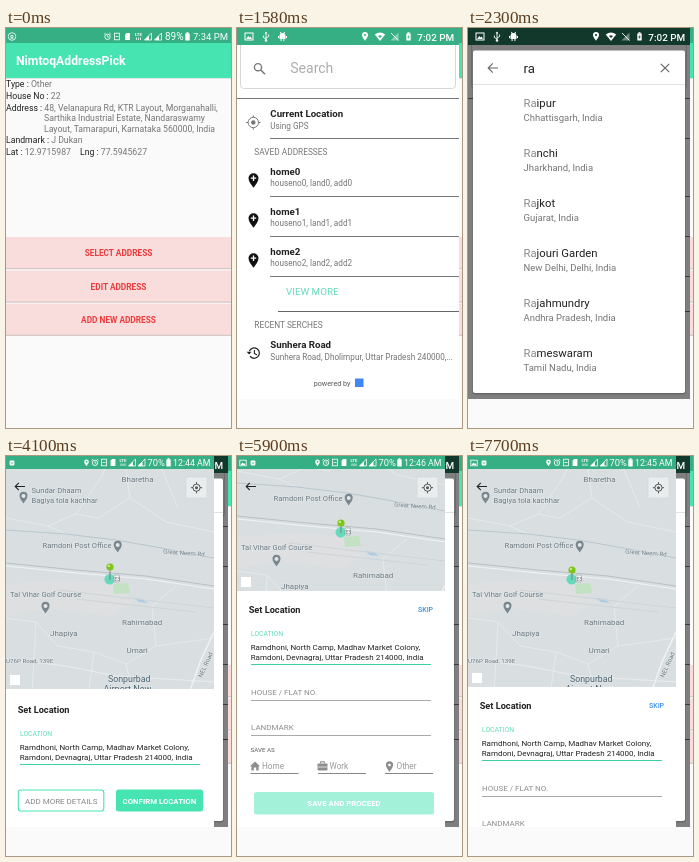
Recreate the animation shown at these times as an HTML page. Size 225 px wide and 400 px high, loop 8000 ms.

```html
<!DOCTYPE html>
<html lang="en">
<head>
<meta charset="utf-8">
<title>Address picker</title>
<style>
html, body { margin: 0; width: 100%; height: 100%; overflow: hidden; background: #fafafa; }
svg { display: block; width: 100%; height: 100%; }
text { font-family: Roboto, "Noto Sans", sans-serif; white-space: pre; }
</style>
</head>
<body>
<svg id="stage" viewBox="0 0 225 400" preserveAspectRatio="none"></svg>
<script>
const LOOP = 8000;
const GREEN = '#46e4b1', BAR = '#36af85', INK = '#212121', GREY = '#757575';

// Drawing helpers
const rect = (x, y, w, h, fill, more = '') =>
  `<rect x="${x}" y="${y}" width="${w}" height="${h}" fill="${fill}" ${more}/>`;
const text = (x, y, size, str, fill = INK, more = '') =>
  `<text x="${x}" y="${y}" font-size="${size}" fill="${fill}" ${more}>${str}</text>`;
const bold = (x, y, size, str, fill = INK, more = '') =>
  text(x, y, size, str, fill, 'font-weight="700" ' + more);
const path = (d, fill, more = '') => `<path d="${d}" fill="${fill}" ${more}/>`;
const line = (d, color, width = 1, more = '') =>
  path(d, 'none', `stroke="${color}" stroke-width="${width}" ${more}`);
const rule = (x1, x2, y, color) => rect(x1, y, x2 - x1, 1, color);
const dot = (x, y, r, fill, more = '') => `<circle cx="${x}" cy="${y}" r="${r}" fill="${fill}" ${more}/>`;
const ring = (x, y, r, color, width = 1) => dot(x, y, r, 'none', `stroke="${color}" stroke-width="${width}"`);
const group = (body, more = '') => `<g ${more}>${body}</g>`;
const at = (x, y, body, turn = 0) => group(body, `transform="translate(${x} ${y}) rotate(${turn})"`);
const MID = 'text-anchor="middle"';

// Icons centred on 0,0
const drop = (r, fill) =>
  path(`M0 ${r * 1.6}C${-r * 0.4} ${r} ${-r} ${r * 0.4} ${-r} ${-r * 0.3}A${r} ${r} 0 0 1 ${r} ${-r * 0.3}C${r} ${r * 0.4} ${r * 0.4} ${r} 0 ${r * 1.6}Z`, fill);
const target = (r, color) => ring(0, 0, r, color, 1) + dot(0, 0, r * 0.42, color) +
  line(`M0 ${-r - 2}V${-r}M0 ${r}V${r + 2}M${-r - 2} 0H${-r}M${r} 0H${r + 2}`, color, 1);
const arrow = (head, color) => line(`M5 0H-4.6M${head - 4.8} ${-head}L-4.8 0L${head - 4.8} ${head}`, color, 1.1);
const plusPin = drop(5, '#111') + line('M0 -4.2V1.2M-2.7 -1.5H2.7', '#fff', 1.3);
const clock = line('M-4.6 -2A5.2 5.2 0 1 1 -4 3.2', '#222', 1.2) +
  path('M-7.4 -1.2H-2.4L-4.9 1.6Z', '#222') + line('M0.4 -3V0.4L3 2', '#222', 1.1);
const mapPin = drop(4, '#78868d') + dot(0, -1, 2, '#e3e7e9');
const picture = rect(-4, -3.5, 8, 7, 'none', 'stroke="#fff"') + path('M-3 2.5L-0.8 -0.5L0.6 1L1.6 0L3 2.5Z', '#fff');
const pocket = rect(-3, -3, 6, 6, '#fff', 'rx="1"') + line('M-1.5 -1L0 1L1.5 -1', BAR, 0.9);
const signal = path('M-3.5 3.5H3.5V-3.5Z', 'none', 'stroke="#fff" stroke-width="0.8"') + path('M-3.5 3.5H1V-1Z', '#fff');
const battery = rect(-2.2, -3.2, 4.4, 7.2, '#fff', 'rx="0.6"') + rect(-1, -4.3, 2, 1.2, '#fff');
const alarm = ring(0, 0.3, 2.7, '#fff', 0.9) + line('M0 -1.2V0.6H1.4M-3.4 -2.2L-1.8 -3.5M3.4 -2.2L1.8 -3.5', '#fff', 0.8);
const box = rect(-2.5, -3.3, 5, 6.6, 'none', 'stroke="#fff" stroke-width="0.8"') + line('M-1.5 0H1.5', '#fff', 0.8);
const sim = path('M-2.4 -2L-0.8 -3.6H2.4V3.6H-2.4Z', '#fff');
const lte = bold(0, -0.7, 4.4, 'LTE', '#fff', MID) + line('M-2 3.5V1M0 3.5V1M2 1V3.5', '#fff', 0.8);

function homeScreen() {
  const pair = (x, y, label, value) => text(x, y, 8.7, `${label} : <tspan fill="${GREY}">${value}</tspan>`);
  const button = (y, label) =>
    rect(0, y + 1.2, 225, 31, '#d2c6c6') + rect(0, y, 225, 31, '#f9dddd') +
    bold(112.5, y + 19, 8.3, label, '#ee3b3b', MID);
  return rect(0, 0, 225, 400, '#fafafa') + rect(0, 0, 225, 16, BAR) + rect(0, 15, 225, 35, GREEN) +
    rect(0, 50, 225, 1, '#dfe6e3') +
    ring(6, 8.5, 3.8, '#fff', 0.8) + bold(6, 10.6, 5.5, 'R', '#fff', MID) +
    at(101.5, 8.5, alarm) + at(111, 8.5, box) + at(121.5, 8.5, sim) + at(132.5, 8.5, lte) +
    at(142, 8.5, signal) + at(152, 8.5, signal) +
    text(159, 12.2, 10, '89%', '#fff') + at(181.5, 8.5, battery) + text(187, 12.2, 9.5, '7:34 PM', '#fff') +
    bold(10, 37, 12.2, 'NimtoqAddressPick', '#fff') +
    pair(0, 59, 'Type', 'Other') + pair(0, 71.3, 'House No', '22') +
    pair(0, 83, 'Address', '48, Velanapura Rd, KTR Layout, Morganahalli,') +
    text(38, 93.4, 8.7, 'Sarthika Industrial Estate, Nandaraswamy', GREY) +
    text(38, 103.6, 8.7, 'Layout, Tamarapuri, Karnataka 560000, India', GREY) +
    pair(0, 115.4, 'Landmark', 'J Dukan') + pair(0, 127.4, 'Lat', '12.9715987') + pair(74, 127.4, 'Lng', '77.5945627') +
    button(209, 'SELECT ADDRESS') + button(242.5, 'EDIT ADDRESS') + button(275.7, 'ADD NEW ADDRESS');
}

// Status bar shared by the search screens
const searchBar = (color) => rect(0, 0, 222, 17, color) +
  at(12, 8.5, picture) +
  at(29, 8.5, line('M0 4.5V-4M-2.6 -1V1L0 2.6M2.6 -2V0L0 1.6', '#fff', 0.9) + dot(0, 4, 1.2, '#fff') + path('M-1.4 -3H1.4L0 -5Z', '#fff')) +
  at(45.5, 8.5, path('M-3 -0.5A3 3 0 0 1 3 -0.5V2.5H-3Z', '#fff') + line('M-1.4 2V4.6M1.4 2V4.6M-2 -4.6L-1 -2M2 -4.6L1 -2M-4 -0.5V1.6M4 -0.5V1.6', '#fff', 1)) +
  at(128, 8, drop(3, '#fff') + dot(0, -1, 1.1, color)) +
  at(143, 8.5, path('M-5.2 -2Q0 -6 5.2 -2L0 4.6Z', '#fff') + path('M0 1.6L-2 -0.6L0 -1.2L2 -0.6Z', color)) +
  at(157.5, 8.5, path('M-4 4H4V-4Z', '#fff', 'opacity="0.4"') + line('M-3.5 -3.5L4 4', '#fff', 0.9)) +
  at(171.5, 8.5, battery + path('M0.5 -2L-1.3 1H0L-0.5 3L1.3 0H0Z', color)) +
  text(180.3, 12.5, 9.9, '7:02 PM', '#fff', 'font-weight="500"');

function listScreen() {
  const row = (y, title, sub) => bold(33.3, y, 9.7, title) + text(33.3, y + 11.8, 8.2, sub, GREY);
  const saved = [0, 1, 2].map(i => {
    const y = 146.5 + i * 40;
    return row(y, 'home' + i, `houseno${i}, land${i}, add${i}`) + at(16.5, y + 5.2, plusPin) + rule(33, 222, 168 + i * 40, '#777');
  }).join('');
  return rect(0, 0, 222, 371, '#fff') + searchBar(BAR) +
    path('M3.5 17V57.5Q3.5 60.5 6.5 60.5H215.5Q218.5 60.5 218.5 57.5V17', '#fff', 'stroke="#d8d8d8" stroke-width="1"') +
    ring(21, 39.2, 3.6, '#777', 1.4) + line('M23.8 42L28 46.2', '#777', 1.6) +
    text(53.3, 45.3, 14, 'Search', '#adadad') + rule(0, 222, 70, '#777') +
    row(89, 'Current Location', 'Using GPS') + at(16.3, 94.5, target(5.2, '#777')) +
    rule(33, 222, 110, '#777') + text(17.3, 127, 8.3, 'SAVED ADDRESSES', GREY) + saved +
    text(49, 267, 9.8, 'VIEW MORE', '#5fdcb6') + rule(41, 222, 283, '#666') +
    text(17.3, 300, 8.3, 'RECENT SERCHES', GREY) +
    row(320, 'Sunhera Road', 'Sunhera Road, Dholimpur, Uttar Pradesh 240000,...') + at(17, 325, clock) +
    text(76.7, 358, 7.2, 'powered by', '#555') + rect(118, 350.5, 8.5, 8.5, '#4285f4');
}

function suggestScreen() {
  const places = [
    ['ipur', 'Chhattisgarh, India'], ['nchi', 'Jharkhand, India'], ['jkot', 'Gujarat, India'],
    ['jouri Garden', 'New Delhi, Delhi, India'], ['jahmundry', 'Andhra Pradesh, India'], ['meswaram', 'Tamil Nadu, India']
  ];
  const rows = places.map(([rest, sub], i) =>
    text(55.5, 79.2 + i * 50, 11.3, `<tspan fill="#8a8a8a">Ra</tspan>${rest}`) +
    text(55.5, 93.3 + i * 50, 9.5, sub, GREY)).join('');
  return rect(0, 0, 222, 371, '#000', 'opacity="0.5"') + searchBar('#12382c') +
    rect(4.5, 23, 213, 343.4, '#000', 'rx="2" opacity="0.2"') + rect(5, 22.5, 212, 342.5, '#fff', 'rx="2"') +
    at(25, 40, arrow(4.6, '#666')) + text(55.5, 44.5, 13.2, 'ra') +
    line('M192.8 35.8L201.2 44.2M201.2 35.8L192.8 44.2', '#666', 1.2) + rule(5, 217, 56, '#e0e0e0') + rows;
}

function mapArt(pinY) {
  const minor = '#e8ecee', road = '#f0f3f4', label = '#67777f', city = '#46606f';
  const name = (x, y, str, size = 8, color = label) =>
    text(x, y, size, str, color, 'stroke="#e6eaec" stroke-width="1" paint-order="stroke"');
  return rect(0, 0, 208, 300, '#d9dfe1') +
    path('M0 128L60 124L112 128L128 146L104 160L40 152L0 160Z', '#dddfe0') +
    line('M0 62L42 70L70 58L96 20L104 0M42 70L60 78M118 0L124 42L160 66L208 76M124 42L92 62L70 58M150 0L172 52', minor, 0.8) +
    line('M0 162L30 166L52 190L88 196L120 208L150 190L208 182M88 196L82 240M30 166L26 240M150 190L146 150L170 130M120 208L128 240', minor, 0.8) +
    line('M0 74L60 78L110 84L150 91L208 102', '#b9c6cd', 1.2) +
    line('M0 107L70 114L140 120L208 130', '#b6c1c6', 1) +
    line('M0 110L70 117L140 123L208 133', road, 1) +
    path('M107 128L122 127L124 137L108 138Z', '#c3e2c3') + path('M128 142L136 143L142 147L133 146Z', '#a9cbe4') +
    line('M52 134L208 152M70 143L190 156', '#cdd4d7', 1.2) +
    line('M0 203L60 210L110 220L208 226', minor, 1.2) +
    line('M208 176L194 206L182 240', road, 1.4) +
    name(115.5, 26.2, 'Bharetha') + at(17.5, 41, mapPin) +
    name(25.5, 37, 'Sundar Dhaam', 7.6) + name(25.5, 46.6, 'Bagiya tola kachhar', 7.6) +
    name(36.5, 92, 'Ramdoni Post Office', 7.6) + at(111.7, 90, mapPin) +
    at(157, 97.5, name(0, 0, 'Great Neem Rd', 6.2), 4) +
    name(4, 141, 'Tal Vihar Golf Course', 7.6) + at(39.5, 151, mapPin) +
    name(116, 169, 'Rahimabad') + name(44, 180, 'Jhapiya') + name(120.5, 197, 'Umari') +
    name(0, 206.5, 'U76P Road, 139E', 6.2) + at(196, 222, name(0, 0, 'NEL Road', 6.2), -66) +
    name(102, 225.5, 'Sonpurbad', 8.8, city) + name(97.5, 236, 'Airport New', 9, city) +
    dot(103.7, 123.3, 5.2, '#48d8b4', 'opacity="0.8"') +
    rect(108, 119, 5.5, 7, '#f1f3f3', 'rx="1" stroke="#8d979b" stroke-width="0.6"') + text(108.6, 124.5, 4.6, 'E3', '#666') +
    line(`M104 ${pinY}V124`, '#777', 0.9) + dot(104, pinY, 3.6, '#7fc41c') + dot(102.9, pinY - 1.1, 1.2, '#c9ec85');
}

// Map screen: left status icons, clock, map offset, pin height, top of the sheet, sheet content
function mapScreen({ notices, time, shift = 0, pinY, top, sheet }) {
  const bar = rect(0, 0, 208, 13, BAR) +
    notices.map((icon, i) => at(6 + i * 10, 7, group(icon, 'transform="scale(0.8)"'))).join('') +
    at(80.5, 6.5, drop(2.3, '#fff') + dot(0, -0.7, 0.9, BAR)) + at(89, 6.5, alarm) +
    at(98, 6.5, box) + at(107, 6.5, sim) + at(117, 6.5, lte) + at(126, 6.5, signal) + at(135.5, 6.5, signal) +
    text(141.5, 10.2, 9.3, '70%', '#fff') + at(162.5, 6.5, battery) + text(167, 10.2, 8.8, time, '#fff');
  return group(
    at(0, shift, mapArt(pinY)) + bar + at(14, 30.5, arrow(3.6, '#222')) +
    rect(180, 21, 21, 21, '#e9edee', 'rx="1.5" stroke="#cfd5d7" stroke-width="0.6"') + at(190.5, 31.7, target(3.6, '#555')) +
    rect(4, top - 14, 10, 10, '#fff') +
    rect(0, top, 208, 371 - top, '#fff') + sheet, 'clip-path="url(#phone)"');
}

const address = (y) => text(14, y, 6.8, 'LOCATION', '#5fdcb9') +
  text(13.7, y + 14.2, 8, 'Ramdhoni, North Camp, Madhav Market Colony,') +
  text(13.7, y + 23.5, 8, 'Ramdoni, Devnagraj, Uttar Pradesh 214000, India') +
  rule(14, 194, y + 28, '#3fd0a2');

const confirmSheet = bold(11.7, 257, 9.2, 'Set Location') + address(280) +
  rect(12.3, 334, 85.5, 21, '#fff', `rx="2.5" stroke="${GREEN}" stroke-width="1.1"`) +
  text(55.2, 347.7, 8, 'ADD MORE DETAILS', '#858585', MID) +
  rect(110, 333.5, 87, 22, GREEN, 'rx="2.5"') + bold(153.4, 347.7, 7.8, 'CONFIRM LOCATION', '#fff', MID);

function detailSheet() {
  const soft = '#8d8d8d';
  const option = (x, w, label, icon) => at(x + 4.5, 310, icon) + text(x + 11.5, 312.7, 8.2, label, '#999') + rule(x, x + w, 317, '#888');
  const field = (y, label) => text(14, y, 8, label, soft) + rule(14, 194, y + 5, '#aaa');
  const house = path('M-5 0.3L0 -4.6L5 0.3H3.6V4.5H1.2V1.4H-1.2V4.5H-3.6V0.3Z', soft);
  const bag = rect(-5, -2.6, 10, 7, soft, 'rx="0.8"') + line('M-1.8 -2.6V-4.2H1.8V-2.6', soft, 1.1) + line('M-5 1H5', '#fff', 0.7);
  const pin = drop(3.6, soft) + dot(0, -1, 1.3, '#fff');
  return bold(11.7, 157, 9.2, 'Set Location') + text(181, 156.4, 7, 'SKIP', '#3a8fe6', 'font-weight="500"') + address(180) +
    field(239, 'HOUSE / FLAT NO.') + field(274, 'LANDMARK') +
    text(13.5, 296.3, 6.2, 'SAVE AS', '#555') +
    option(13.5, 48, 'Home', house) + option(81, 48, 'Work', bag) + option(148, 48, 'Other', pin) +
    rect(17, 336, 180, 22.5, '#a2f1d8', 'rx="2.5"') + bold(107, 350.2, 7.8, 'SAVE AND PROCEED', '#fff', MID);
}

// Each scene is laid over the ones before it
const scenes = [
  [0, homeScreen()],
  [500, listScreen()],
  [2300, suggestScreen()],
  [4100, mapScreen({ notices: [pocket], time: '12:44 AM', pinY: 111, top: 233, sheet: confirmSheet })],
  [5900, mapScreen({ notices: [picture, pocket], time: '12:46 AM', shift: -47, pinY: 114, top: 135, sheet: detailSheet() })],
  [7700, mapScreen({ notices: [picture, pocket], time: '12:45 AM', pinY: 114, top: 231, sheet: at(0, 96, detailSheet()) })]
];

const stage = document.getElementById('stage');
stage.innerHTML = '<defs><clipPath id="phone"><rect width="208" height="371"/></clipPath></defs>' +
  scenes.map(([, body]) => group(body, 'class="scene"')).join('');
const layers = [...stage.querySelectorAll('.scene')];

function draw(t) {
  layers.forEach((layer, i) => { layer.style.display = t >= scenes[i][0] ? '' : 'none'; });
}

function tick() {
  draw(performance.now() % LOOP);
  requestAnimationFrame(tick);
}
tick();
</script>
</body>
</html>
```
